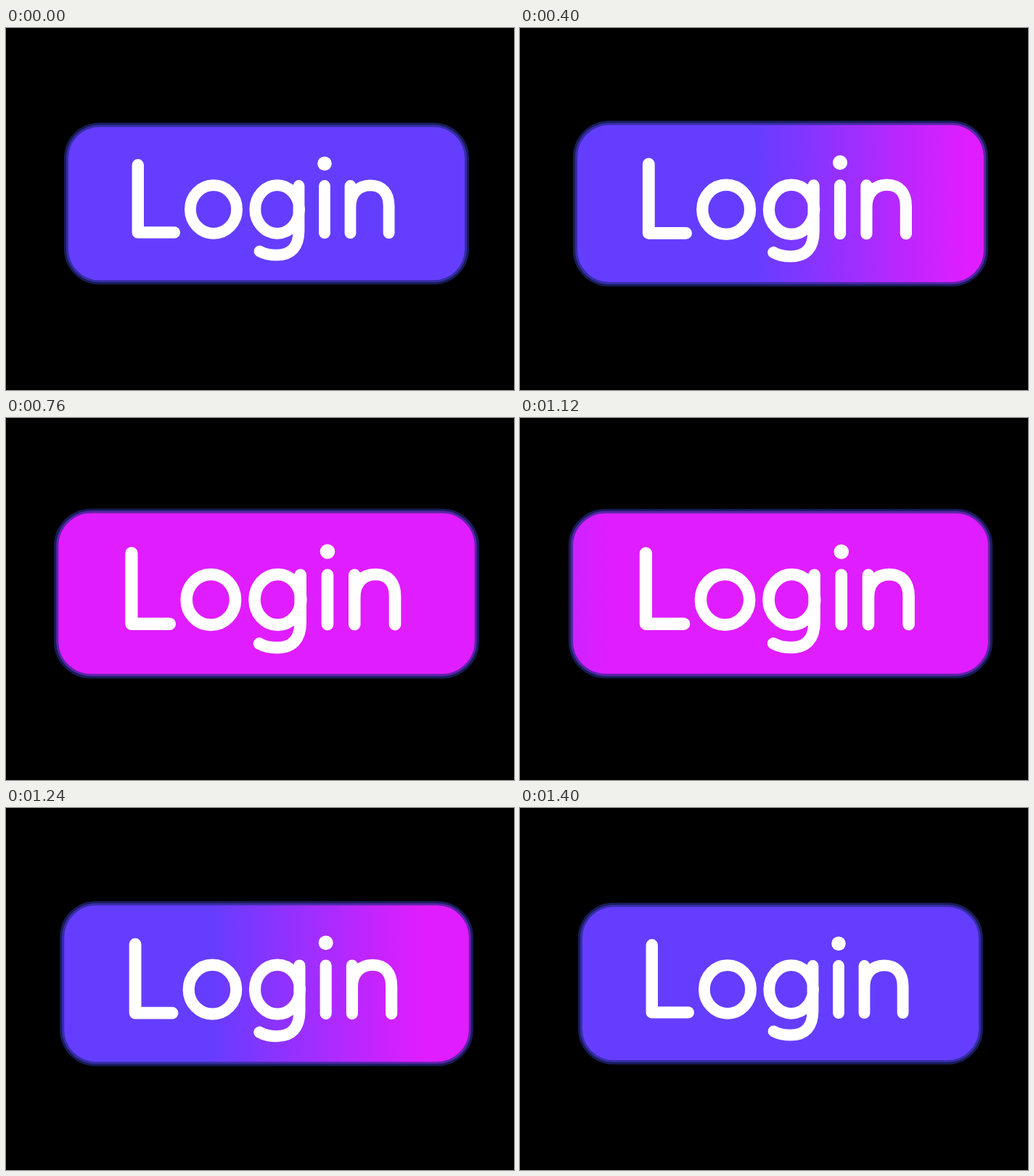
Write an HTML page with a canvas that moves like this. It is 700 by 500 pixels and loops after 1.64 s.

```html
<!DOCTYPE html>
<html lang="en">
<head>
<meta charset="utf-8">
<title>Login button</title>
<style>
html, body { margin: 0; width: 100%; height: 100%; overflow: hidden; background: #000; }
canvas { display: block; width: 700px; height: 500px; }
</style>
</head>
<body>
<canvas id="stage" width="700" height="500" role="img" aria-label="Login">Login</canvas>
<script>
const ctx = document.getElementById('stage').getContext('2d');
const LOOP = 1640;
const CENTER = { x: 359, y: 242.5 };
const BOX = { w: 552, h: 217.5, r: 46, border: 6 };
const GROW = 0.05;
const PURPLE = '#653dff', MAGENTA = '#e01dff', BORDER = 'rgba(35, 40, 128, 0.7)';
const BLEND = 285;               // width of the colour blend
const BLEND_REST = 552, BLEND_HOVER = -280;

// Rounded lettering, drawn as centre lines
const letterL = new Path2D('M181.8 189.3V282.4H231.8');
const letters = new Path2D(
  'M403.5 218V280C403.5 302 393 313.7 373 313.7C362 313.7 356 312 349.5 308.3' +
  'M439 218V283.2' +
  'M474.5 218V283.2' +
  'M474.5 247C474.5 229 485 217.3 502 217.3C518.5 217.3 527.6 228 527.6 246V283.2');
for (const [x, rx] of [[286, 32.1], [373.7, 30.4]]) {
  letters.moveTo(x + rx, 250.5);
  letters.ellipse(x, 250.5, rx, 33.3, 0, 0, Math.PI * 2);
}
const dot = new Path2D();
dot.arc(439, 187.3, 9.8, 0, Math.PI * 2);

function bezier(x1, y1, x2, y2) {
  const at = (s, a, b) => 3 * a * s * (1 - s) ** 2 + 3 * b * s * s * (1 - s) + s ** 3;
  return u => {
    if (u <= 0) return 0;
    if (u >= 1) return 1;
    let lo = 0, hi = 1;
    for (let i = 0; i < 24; i++) {
      const mid = (lo + hi) / 2;
      if (at(mid, x1, x2) < u) lo = mid; else hi = mid;
    }
    return at(lo, y1, y2);
  };
}
const easeInOut = bezier(0.42, 0, 0.58, 1);
const easeSettle = bezier(0.3, 0, 0.3, 1);

function draw(t) {
  const back = easeInOut((t - 1072) / 310);
  const size = easeInOut((t - 275) / 250) - back;
  const sweep = easeSettle((t - 285) / 400) - back;
  const scale = 1 + GROW * size;

  ctx.setTransform(1, 0, 0, 1, 0, 0);
  ctx.fillStyle = '#000';
  ctx.fillRect(0, 0, 700, 500);
  ctx.translate(CENTER.x, CENTER.y);
  ctx.scale(scale, scale);
  ctx.translate(-CENTER.x, -CENTER.y);

  const left = CENTER.x - BOX.w / 2, top = CENTER.y - BOX.h / 2;
  const start = left + BLEND_REST + (BLEND_HOVER - BLEND_REST) * sweep;
  const fill = ctx.createLinearGradient(start, 0, start + BLEND, 0);
  fill.addColorStop(0, PURPLE);
  fill.addColorStop(1, MAGENTA);
  ctx.beginPath();
  ctx.roundRect(left, top, BOX.w, BOX.h, BOX.r);
  ctx.fillStyle = fill;
  ctx.fill();
  ctx.strokeStyle = BORDER;
  ctx.lineWidth = BOX.border;
  ctx.stroke();

  ctx.strokeStyle = ctx.fillStyle = '#fff';
  ctx.lineCap = ctx.lineJoin = 'round';
  ctx.lineWidth = 16.4;
  ctx.stroke(letterL);
  ctx.lineWidth = 15.8;
  ctx.stroke(letters);
  ctx.fill(dot);
}

const began = performance.now();
function tick() {
  draw((performance.now() - began) % LOOP);
  requestAnimationFrame(tick);
}
tick();
</script>
</body>
</html>
```
